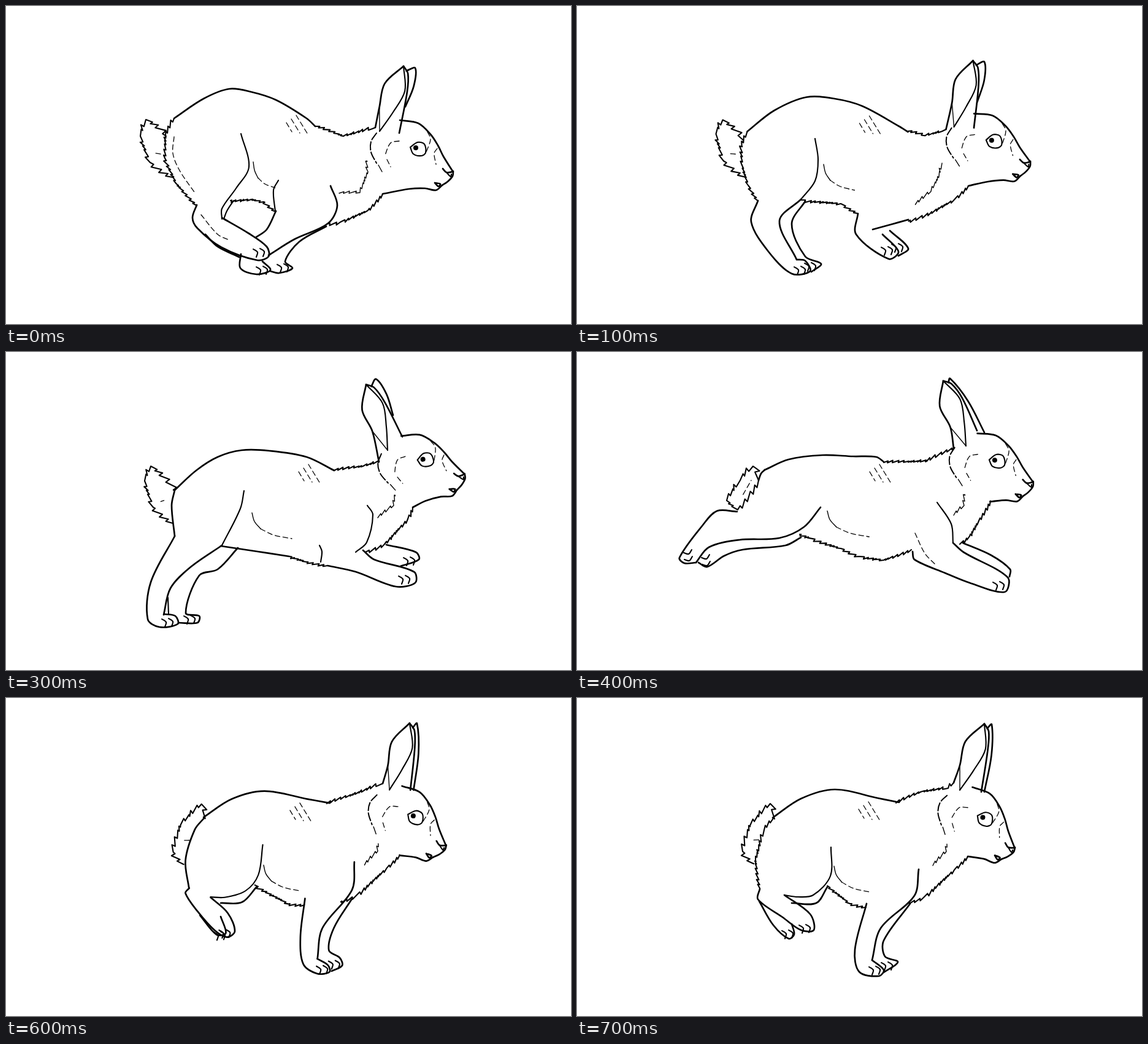
These frames come from a looping animation (921x518 px, 800 ms). An HTML page with a canvas:

```html
<!DOCTYPE html>
<html lang="en">
<head>
<meta charset="utf-8">
<title>Running rabbit</title>
<style>
html, body { margin: 0; width: 100%; height: 100%; overflow: hidden; background: #fff; }
canvas { display: block; }
</style>
</head>
<body>
<canvas id="stage" width="921" height="518"></canvas>
<script>
const ctx = document.getElementById('stage').getContext('2d');
const STEP = 100;

// Line kinds: b bold, m medium, t thin, d dashed, h broken, z fur, y fine fur, j tail fur
const WIDTH = { b: 2.7, m: 2.1, t: 1.4, d: 1.3, h: 2, z: 2.1, y: 1.4, j: 2.1 };
const DASH = { d: [8, 5], h: [13, 4] };
const TOOTH = { z: [7, 2.6], y: [8, 2.6], j: [11, 5] };

const points = text => text.split(' ').map(p => p.split(',').map(Number));
const parse = text => ({ kind: text[0], pts: points(text.slice(2)) });

// body: back, nape, rump, chest, inner chest
// ear: tip, root, rim end, far tip, far end
const pose = (tilt, { eye, hatch, flank, ear, tail, toes, body, legs }) => ({
  tilt, eye: points(eye), hatch: points(hatch), flank: points(flank), ear: points(ear),
  tail: points(tail), toes: points(toes), body: body.map(parse), legs: legs.map(parse)
});

const gather = pose(0, {
  eye: '671,233', hatch: '457,190', flank: '403,254,.55',
  ear: '648,98 609,204 641,207 667,101 651,164',
  tail: '272,279 235,255 219,212 228,185 261,212',
  toes: '410,401,0 415,430,0 449,426,0',
  body: [
    'b 274,183 322,151 364,135 400,140 440,153 490,183 504,196',
    'z 504,196 550,212 597,200 602,198',
    'z 311,325 278,290 260,250 260,212 274,183',
    'z 614,306 590,333 545,352 523,355',
    'y 543,305 577,304 590,270 588,252'
  ],
  legs: [
    'm 383,208 396,262 375,297 352,330 352,347',
    'b 352,345 395,370 425,392 428,408 409,414 351,393 312,362 304,345 311,324',
    'd 318,340 345,372 363,381',
    'd 274,213 272,240 283,268 309,306',
    'b 325,372 345,392 380,409',
    'z 440,335 420,319 400,315 366,317',
    'm 355,347 360,334 371,317',
    'm 444,284 436,300 439,335',
    'b 440,334 425,364 407,377',
    'b 529,293 540,325 525,354 470,380 428,406',
    'b 383,404 382,427 408,437 431,430 418,416',
    'b 522,359 478,384 455,416 467,427 445,435 431,432'
  ]
});

const plant = pose(-7, {
  eye: '687,208', hatch: '464,192', flank: '401,262,1',
  ear: '643,80 620,190 653,190 661,81 654,148',
  tail: '275,278 243,250 234,205 247,186 281,225',
  toes: '320,432,0 341,428,0 554,390,0 572,390,0',
  body: [
    'b 281,226 320,190 384,162 440,162 490,173 560,209 575,214',
    'z 573,212 590,210 601,204',
    'b 279,310 281,290 276,250 281,226',
    'z 662,280 640,298 610,320 558,346',
    'y 560,342 577,300 590,285 602,260'
  ],
  legs: [
    'm 391,224 392,245 386,280 369,317',
    'b 279,310 262,355 280,415 305,439 336,438 332,421 317,419',
    'b 369,317 320,345 305,375 318,419',
    'b 375,321 338,352 329,393 343,418 358,425 356,436 338,438',
    'z 405,321 369,318',
    'b 400,321 450,329 478,345',
    'm 491,321 478,345',
    'b 478,345 473,356 500,381 562,404 576,398 570,376 538,354',
    'b 509,355 545,351 562,342',
    'b 543,352 580,365 593,388 573,402'
  ]
});

const push = pose(-13, {
  eye: '683,176', hatch: '477,195', flank: '401,262,1',
  ear: '587,53 622,160 646,138 603,44 631,103',
  tail: '272,279 240,253 226,210 236,186 275,226',
  toes: '261,440,0 297,435,0 647,370,0 655,340,0',
  body: [
    'b 275,225 310,193 345,171 384,160 430,161 490,171 535,193',
    'z 535,193 582,186 608,179',
    'b 275,300 270,250 275,225',
    'z 663,253 655,272 617,313 586,326',
    'y 606,270 632,250 634,233'
  ],
  legs: [
    'm 388,226 382,255 352,315',
    'b 275,300 236,375 231,435 250,448 280,443 276,430 258,427',
    'b 352,315 300,351 268,385 257,428',
    'b 378,319 345,354 315,364 293,425 315,430 312,441 281,441',
    'm 264,400 265,427',
    'z 524,348 490,342 462,333',
    'b 350,316 410,325 462,333',
    'm 511,315 515,325 513,342',
    'b 524,348 570,358 635,382 667,376 665,358 600,338 582,323',
    'm 589,250 598,265 588,310 570,326',
    'b 620,314 668,326 673,338 643,349'
  ]
});

const stretch = pose(-3, {
  eye: '684,178', hatch: '477,195', flank: '408,259,1.05',
  ear: '597,47 634,153 652,128 608,43 664,131',
  tail: '296,209 262,257 244,242 266,209 287,186 296,209',
  toes: '182,329,90 211,337,90 685,380,0',
  body: [
    'b 306,192 345,175 400,168 450,170 488,171 500,179',
    'z 500,180 570,178 614,157',
    'b 296,209 300,198 306,192',
    'z 674,243 655,275 640,300 624,313',
    'y 614,266 631,250 632,232'
  ],
  legs: [
    'b 261,260 228,259 205,282 167,335 175,344 194,343',
    'b 194,343 215,318 265,306 330,303 370,285 397,253',
    'b 198,343 212,350 240,332 270,322 340,315 365,302',
    'z 545,322 500,339 460,333 430,320 363,297',
    'd 551,295 567,328 583,345',
    'b 547,325 550,338 600,360 640,376 697,391 702,367 630,326 613,311',
    'm 587,245 610,280 613,311',
    'b 629,311 675,331 706,354 705,366'
  ]
});

const land = pose(-1, {
  eye: '683,178', hatch: '489,196', flank: '426,260,.95',
  ear: '617,34 632,147 660,130 629,30 667,130',
  tail: '300,278 290,258 302,198 343,178 343,192',
  toes: '327,398,0 355,391,0 569,440,0 588,429,0',
  body: [
    'b 342,190 388,168 430,169 500,175 543,179',
    'z 543,179 580,163 615,147',
    'b 300,307 303,260 326,210 343,192',
    'z 673,242 655,262 605,306 584,320',
    'y 614,266 633,245 632,232'
  ],
  legs: [
    'b 300,307 287,304 291,345 319,397 335,411 352,397 338,355 325,332',
    'm 427,232 408,285 401,301 350,326 325,330',
    'b 411,305 375,330 350,334',
    'b 352,397 370,400 372,375 350,334',
    'z 515,330 475,333 425,307 401,302',
    'b 516,311 524,375 535,433 565,448 588,440 577,426 557,421',
    'b 588,245 590,295 554,375 557,421',
    'b 601,315 582,360 573,412 606,420 603,440 588,441'
  ]
});

const fold = pose(11, {
  eye: '664,197', hatch: '459,181', flank: '419,274,.9',
  ear: '664,42 624,150 659,153 676,43 664,153',
  tail: '288,270 270,250 282,208 315,172 322,197',
  toes: '369,375,0 341,384,0 483,443,0 503,436,0',
  body: [
    'b 319,195 365,164 420,149 490,163 525,170',
    'z 520,171 560,153 605,147 614,138',
    'z 298,310 291,265 305,215 320,196',
    'z 637,258 615,280 565,325 540,334',
    'y 580,273 602,250 603,238'
  ],
  legs: [
    'b 298,311 295,328 335,357 365,378 386,378 380,352 338,321',
    'm 414,243 413,290 385,321 360,324 338,321',
    'b 408,308 390,334 350,334',
    'b 297,331 320,370 345,392 354,385 350,368',
    'z 471,341 445,335 408,306',
    'b 472,335 453,410 460,446 492,453 500,443 481,427',
    'b 557,279 550,322 495,375 481,427',
    'b 543,335 500,395 502,421 523,430 500,447'
  ]
});

// In-between poses
const lerp = (a, b, t) => a + (b - a) * t;
const mixPt = (p, q, t) => p.map((v, i) => lerp(v, q[i], t));
const mixPts = (a, b, t) => a.map((p, i) => {
  const f = i * (b.length - 1) / Math.max(1, a.length - 1);
  return mixPt(p, mixPt(b[Math.floor(f)], b[Math.ceil(f)], f % 1), t);
});
const mixLines = (a, b, t) =>
  a.map(({ kind, pts }, i) => ({ kind, pts: mixPts(pts, b[i].pts, t) }));

function mixPose(a, b, t, legT) {
  const out = {
    tilt: lerp(a.tilt, b.tilt, t),
    body: mixLines(a.body, b.body, t),
    legs: mixLines(a.legs, b.legs.concat(a.legs.slice(b.legs.length)), legT),
    toes: mixPts(a.toes, b.toes, legT)
  };
  for (const key of ['eye', 'hatch', 'flank', 'ear', 'tail']) out[key] = mixPts(a[key], b[key], t);
  return out;
}

const reach = {
  ...mixPose(gather, plant, 0.5, 0.5),
  toes: points('361,430,0 378,424,0 503,398,0 520,393,0'),
  legs: [
    'm 388,216 393,250 388,285 365,315',
    'b 295,317 284,352 312,400 350,436 380,432 372,415 358,413',
    'b 365,315 330,350 358,413',
    'b 372,318 350,355 372,408 398,420 382,433',
    'z 458,338 430,322 365,316',
    'b 458,338 455,372 508,412 524,400 498,372',
    'b 482,364 515,355 540,348',
    'b 510,366 540,395 524,407'
  ].map(parse)
};
const swing = mixPose(land, fold, 0.87, 0.65);
const poses = [gather, reach, plant, push, stretch, land, swing, fold];

// Line drawing
const noise = n => { const v = Math.sin(n * 127.1 + 3.7) * 43758.5453; return v - Math.floor(v); };
const gap = (p, q) => Math.hypot(q[0] - p[0], q[1] - p[1]) || 1;

// Point part way from p to q, pushed sideways
function beside(p, q, t, off) {
  const len = gap(p, q), dx = q[0] - p[0], dy = q[1] - p[1];
  return [p[0] + dx * t + dy / len * off, p[1] + dy * t - dx / len * off];
}

// Saw teeth of uneven length that lean forward
function furry(pts, [length, height]) {
  const out = [pts[0]];
  let seed = 0;
  for (let i = 1; i < pts.length; i++) {
    const p = pts[i - 1], q = pts[i], len = gap(p, q);
    for (let s = length; s < len; s += length * (0.6 + noise(seed))) {
      const tall = height * (0.4 + noise(++seed));
      out.push(beside(p, q, s / len, tall), beside(p, q, (s - 1) / len, -0.6));
    }
    out.push(q);
  }
  return out;
}

function curve(p) {
  for (let i = 0; i < p.length - 1; i++) {
    const b = p[i], c = p[i + 1], a = p[i - 1] || b, d = p[i + 2] || c, len = gap(b, c);
    const u = len / (gap(a, b) + len) / 3, v = len / (gap(c, d) + len) / 3;
    ctx.bezierCurveTo(b[0] + (c[0] - a[0]) * u, b[1] + (c[1] - a[1]) * u,
      c[0] - (d[0] - b[0]) * v, c[1] - (d[1] - b[1]) * v, c[0], c[1]);
  }
}

function line(kind, pts) {
  ctx.lineWidth = WIDTH[kind];
  ctx.setLineDash(DASH[kind] || []);
  ctx.beginPath();
  ctx.moveTo(pts[0][0], pts[0][1]);
  if (TOOTH[kind]) furry(pts, TOOTH[kind]).forEach(p => ctx.lineTo(p[0], p[1]));
  else curve(pts);
  ctx.stroke();
}
const draw = ({ kind, pts }) => line(kind, pts);

function placed([x, y], degrees, paint) {
  ctx.save();
  ctx.translate(x, y);
  ctx.rotate(degrees * Math.PI / 180);
  paint();
  ctx.restore();
}

// Parts shared by all poses
const FACE = [
  'b -29,-47 1,-42 21,-24 33,-6 42,12 57,36',
  'm -12,-3 0,-11 11,-8 13,6 6,11 -7,8 -12,-3',
  'd 16,-28 21,-16 14,5',
  'd 32,-1 27,7 30,25',
  'b 41,32 47,38 57,37',
  'm 47,38 54,45 55,41',
  'b 58,36 57,44 49,53 40,59',
  'b 28,55 37,57 34,61 28,55',
  'd -30,-13 -44,-10 -54,12',
  'd -50,17 -44,29',
  'h -67,-26 -76,-12 -76,5 -67,23',
  't -64,26 -58,37'
].map(parse);
const JAW = points('-14,65 12,64 30,67 40,59');
const TOE = points('-7,-5 0,0 -2,8');
const FLANK = points('0,0 4,14 14,26 35,36 65,42');

function drawHead(eye, tilt, chin) {
  placed(eye, tilt, () => {
    FACE.forEach(draw);
    ctx.beginPath();
    ctx.arc(-3, -2, 4, 0, 7);
    ctx.fill();
  });
  const a = tilt * Math.PI / 180, c = Math.cos(a), s = Math.sin(a);
  line('b', [chin, ...JAW.map(([x, y]) => [eye[0] + x * c - y * s, eye[1] + x * s + y * c])]);
}

function drawEar([tip, root, rim, farTip, farEnd], base) {
  const side = (t, off) => beside(tip, root, t, off);
  const low = side(0.67, -14);
  line('b', [tip, side(0.33, -19), low, base]);
  line('m', [tip, side(0.33, 16), side(0.67, 10), root]);
  line('t', [low, root]);
  line('b', [tip, side(0.08, 11), side(0.33, 20), rim]);
  line('b', [side(0.05, 7), farTip, beside(farTip, farEnd, 0.45, 5), farEnd]);
}

function drawPose({ tilt, eye, hatch, flank, ear, tail, toes, body, legs }) {
  ctx.fillStyle = '#fff';
  ctx.fillRect(0, 0, 921, 518);
  ctx.fillStyle = ctx.strokeStyle = '#000';
  ctx.lineCap = ctx.lineJoin = 'round';

  body.forEach(draw);
  legs.forEach(draw);
  line('j', tail);
  line('d', [mixPt(tail[1], tail[4], 0.35), mixPt(tail[0], tail[3], 0.4)]);
  drawEar(ear, body[1].pts.at(-1));
  drawHead(eye[0], tilt, body[3].pts[0]);

  const [fx, fy, size] = flank[0];
  const side = FLANK.map(([x, y]) => [fx + x * size, fy + y]);
  line('t', side.slice(0, 3));
  line('d', side.slice(2));

  const [hx, hy] = hatch[0];
  for (let i = 0; i < 3; i++) {
    const x = hx + i * 8, y = hy - i * 6;
    line('d', [[x, y], [x + 9 + i * 5, y + 15 + i * 8]]);
  }
  for (const [x, y, turn] of toes) {
    placed([x, y], turn, () => {
      line('m', TOE);
      line('m', TOE.map(([u, v]) => [u + 11, v - 1]));
    });
  }
}

const start = performance.now();
function tick() {
  const t = Math.max(0, performance.now() - start);
  drawPose(poses[Math.floor(t / STEP) % poses.length]);
  requestAnimationFrame(tick);
}
tick();
</script>
</body>
</html>
```
